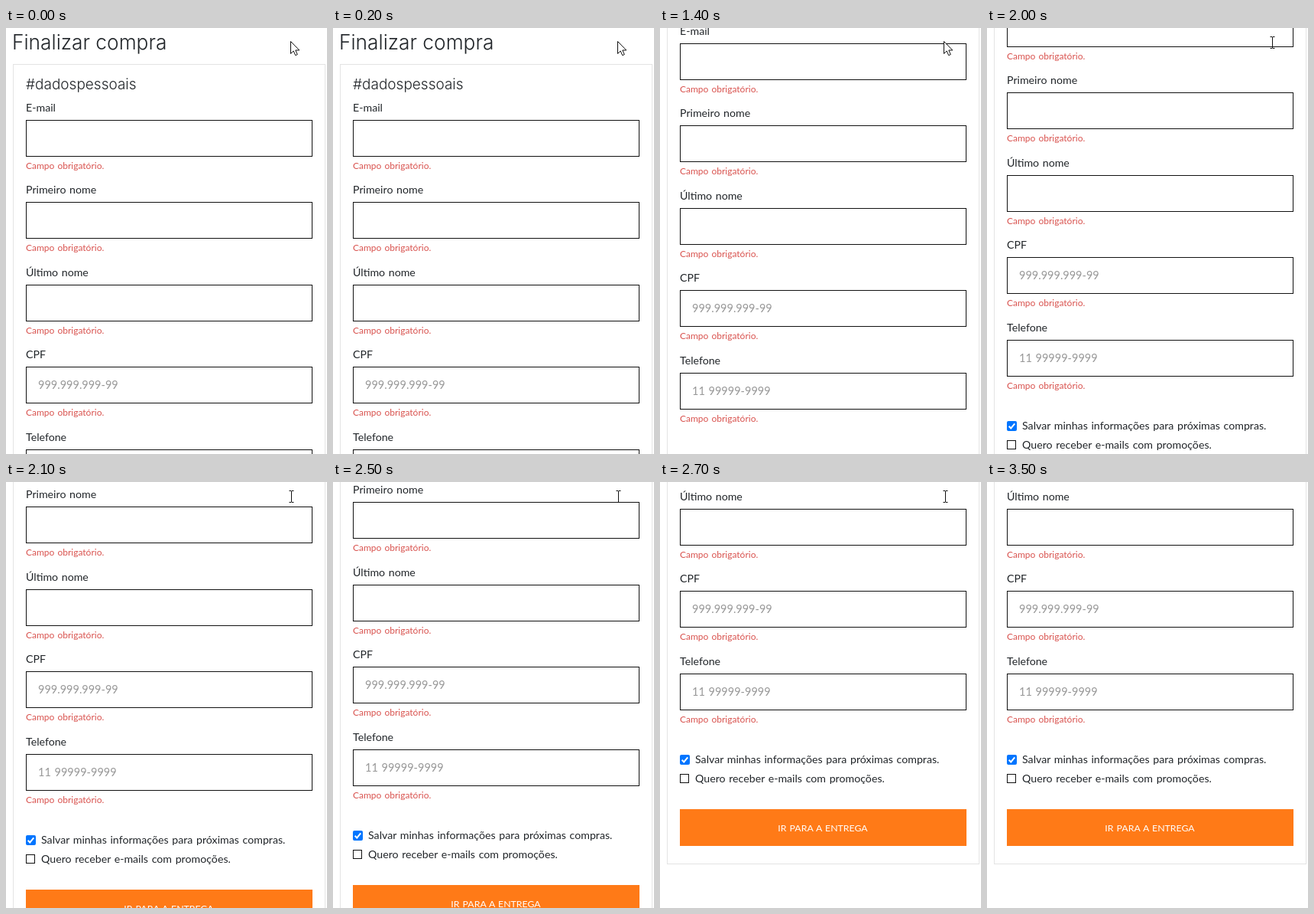
Recreate the animation shown at these times as an HTML page. Size 420 px wide and 556 px high, loop 4200 ms.

```html
<!DOCTYPE html>
<html lang="pt-BR">
<head>
<meta charset="utf-8">
<title>Finalizar compra</title>
<style>
  html, body { margin: 0; width: 100%; height: 100%; overflow: hidden; background: #fff; }
  svg { display: block; }
  text { font: 14.2px Lato, sans-serif; fill: #212529; word-spacing: 1px; }
  .title { font: 300 26.3px Inter, sans-serif; word-spacing: 0; }
  .section { font: 300 19px Inter, sans-serif; }
  .error { font-size: 12px; fill: #d9534f; }
  .hint { font-size: 14.5px; fill: #999; }
  .button { font-size: 12.3px; fill: #fff; text-anchor: middle; }
  .box { fill: #fff; stroke: #111; }
</style>
</head>
<body>
<svg width="420" height="556" viewBox="0 0 420 556">
  <g id="page">
    <rect x="9.5" y="47.5" width="408" height="751" fill="none" stroke="#e3e3e3"/>
    <text class="title" x="8" y="28">Finalizar compra</text>
    <text class="section" x="26" y="80">#dadospessoais</text>
    <g id="fields"></g>
    <rect x="26" y="656" width="13" height="13" rx="2" fill="#0075ff"/>
    <path d="M28.7 662.7l2.6 2.7 5-6" fill="none" stroke="#fff" stroke-width="2"/>
    <text x="46" y="667">Salvar minhas informações para próximas compras.</text>
    <rect class="box" x="26.5" y="681.5" width="11" height="11"/>
    <text x="46" y="692">Quero receber e-mails com promoções.</text>
    <rect x="26" y="727" width="375" height="48" fill="#ff7a17"/>
    <text class="button" x="213" y="755.5">IR PARA A ENTREGA</text>
  </g>
  <path id="arrow" d="M.5 .5v16l3.7-3.5 2.5 5.7 2.6-1.1-2.5-5.6h5z" fill="#fff" stroke="#111"/>
  <path id="beam" d="M-3 -7.5h2.5l.5.5.5-.5H3M0 -7V7M-3 7.5h2.5l.5-.5.5.5H3" fill="none" stroke="#111"/>
</svg>
<script>
const LOOP = 4200;
const $ = id => document.getElementById(id);

const fields = [['E-mail'], ['Primeiro nome'], ['Último nome'],
  ['CPF', '999.999.999-99'], ['Telefone', '11 99999-9999']];

$('fields').innerHTML = fields.map(([label, hint = ''], i) => {
  const y = Math.floor(120 + i * 107.5);
  return `<text x="26" y="${y - 11}">${label}</text>
    <rect class="box" x="26.5" y="${y + .5}" width="374" height="47"/>
    <text class="hint" x="42" y="${y + 29}">${hint}</text>
    <text class="error" x="26" y="${y + 64}">Campo obrigatório.</text>`;
}).join('');

// start time, scroll offset, pointer shape, pointer x, pointer y
const steps = [
  [0, 0, 'arrow', 372, 17],
  [1100, 6, 'arrow', 372, 17],
  [1200, 68, 'arrow', 372, 17],
  [1300, 98, 'arrow', 371, 17],
  [1400, 100, 'arrow', 371, 17],
  [2000, 143, 'beam', 373.5, 19],
  [2100, 195, 'beam', 373.5, 19],
  [2200, 200, 'beam', 373.5, 19],
  [2500, 201, 'beam', 373.5, 19],
  [2600, 255, 'beam', 373.5, 19],
  [2700, 300, 'beam', 373.5, 19],
  [3400, 300, 'beam', 374.5, 7],
  [3500, 300, '', 0, 0]
];

function draw(now) {
  const t = now % LOOP;
  const [, scroll, shape, x, y] = steps.findLast(step => step[0] <= t);
  $('page').setAttribute('transform', `translate(0 ${-scroll})`);
  for (const id of ['arrow', 'beam']) {
    $(id).setAttribute('visibility', id === shape ? 'visible' : 'hidden');
    $(id).setAttribute('transform', `translate(${x} ${y})`);
  }
  requestAnimationFrame(draw);
}
draw(0);
</script>
</body>
</html>
```
